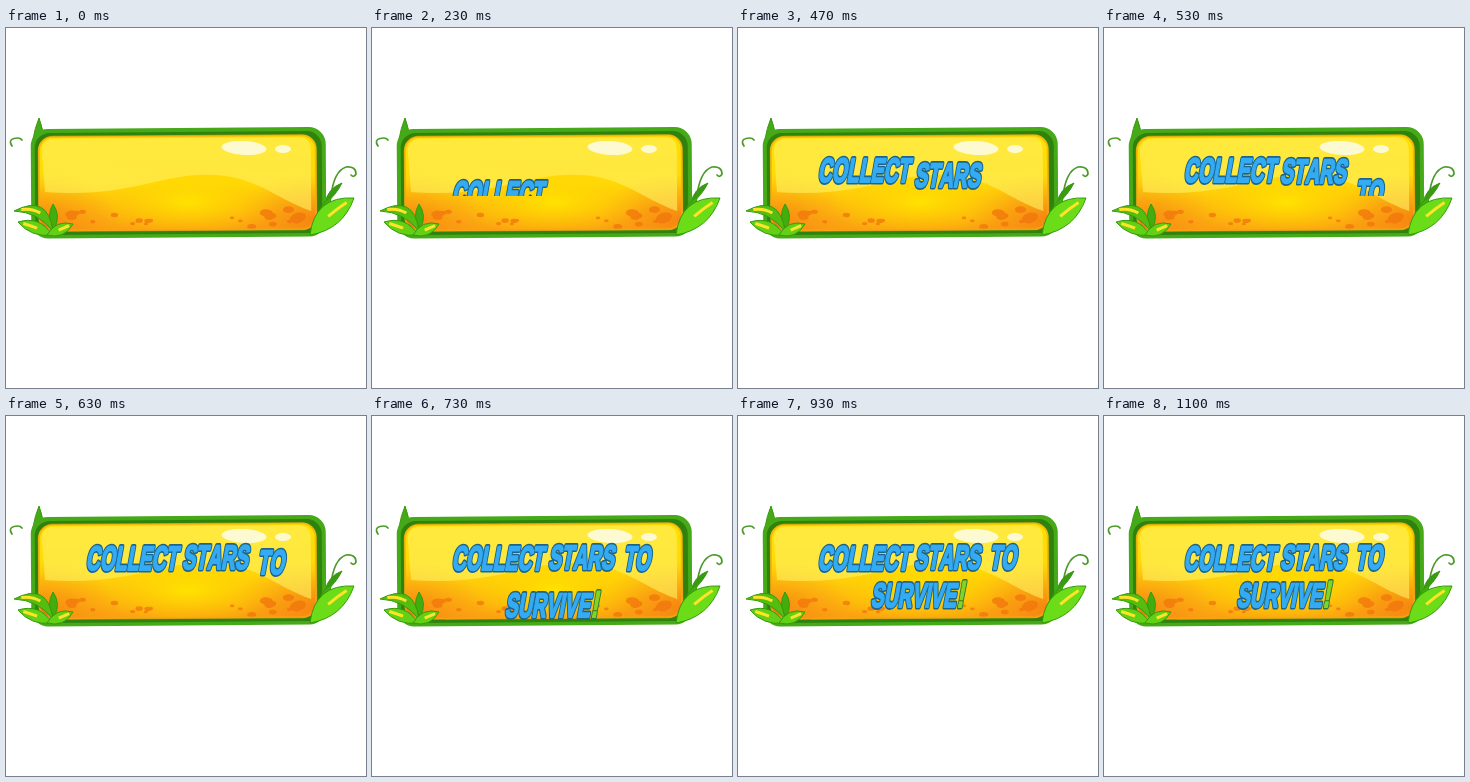
An HTML page that plays this animation: 360 px wide and 360 px high, repeating every 5.01 s.

```html
<!DOCTYPE html>
<html lang="en">
<head>
<meta charset="utf-8">
<title>Collect stars</title>
<style>
  html, body { margin: 0; width: 100%; height: 100%; overflow: hidden; background: #fff; }
  svg { display: block; width: 100vw; height: 100vh; }
  text { font: bold 34px "Liberation Sans", Arial, sans-serif; font-kerning: none; stroke-linejoin: round; }
  .edge { fill: #1b648c; stroke: #1b648c; stroke-width: 5.2; }
  .face { fill: #34abf3; stroke: #34abf3; stroke-width: 2; }
  .bang { font-size: 37px; }
  .bang.edge { fill: #2c7a3a; stroke: #2c7a3a; }
  .bang.face { fill: #86d321; stroke: #86d321; }
  .tendril { fill: none; stroke: #4c9b2a; stroke-width: 1.7; stroke-linecap: round; }
  .vein { fill: none; stroke: #ffe329; stroke-width: 3; stroke-dasharray: 0 45 40 100; }
</style>
</head>
<body>
<svg viewBox="0 0 360 360">
  <defs>
    <linearGradient id="honey" x2="0" y2="1">
      <stop offset="0" stop-color="#ffe000"/>
      <stop offset=".5" stop-color="#ffd908"/>
      <stop offset="1" stop-color="#fb9c12"/>
    </linearGradient>
    <radialGradient id="glow">
      <stop offset="0" stop-color="#ffe200"/>
      <stop offset="1" stop-color="#ffd000" stop-opacity="0"/>
    </radialGradient>
    <radialGradient id="ember">
      <stop offset="0" stop-color="#f47a10" stop-opacity=".75"/>
      <stop offset="1" stop-color="#f98e18" stop-opacity="0"/>
    </radialGradient>
    <clipPath id="panel"><rect x="32.500" y="107.500" width="278" height="95" rx="14"/></clipPath>
    <clipPath id="row0"><rect width="360" height="168"/></clipPath>
    <clipPath id="row1"><rect width="360" height="205"/></clipPath>
  </defs>

  <path class="tendril" d="M6 118Q2 112 8 110.500T16 112"/>
  <path class="tendril" d="M325 168Q328 143 340 139Q350 138 350 146Q348 150 345 147"/>
  <g id="stalks"></g>

  <g transform="rotate(-.4 172 155)">
    <rect x="25" y="100" width="295" height="109.500" rx="17" fill="#46a917"/>
    <rect x="29" y="104" width="287" height="102" rx="15" fill="#2f830d"/>
    <g clip-path="url(#panel)">
      <rect x="32" y="107" width="280" height="97" fill="url(#honey)"/>
      <ellipse cx="36" cy="192" rx="78" ry="48" fill="url(#ember)"/>
      <ellipse cx="308" cy="192" rx="82" ry="46" fill="url(#ember)"/>
      <ellipse cx="182" cy="174" rx="92" ry="36" fill="url(#glow)"/>
      <g id="spots" fill="#f0760c" opacity=".75"></g>
      <path d="M36 122Q36 110 50 110H292Q305 110 305 122V184C270 172 250 147 200 147S120 170 39 163Z" fill="#fff062" opacity=".62"/>
    </g>
    <rect x="33" y="108" width="277" height="94" rx="14" fill="none" stroke="#f5a912" stroke-width="2" opacity=".7"/>
  </g>
  <g fill="#fdfad2">
    <ellipse cx="238" cy="120" rx="22.500" ry="7" transform="rotate(3 238 120)"/>
    <ellipse cx="277" cy="121" rx="8" ry="4"/>
  </g>

  <g id="leaves"></g>
  <g id="words"></g>
</svg>
<script>
const LOOP = 5010, STEP = 100 / 3;
const START = 200, STAGGER = 150, DURATION = 450, RISE = 39;
const el = id => document.getElementById(id);

let seed = 7;
function random() {
  seed = seed * 16807 % 2147483647;
  return seed / 2147483647;
}

// Spots thin out and shrink away from the lower corners.
function spot(_, i) {
  const away = random() ** 1.3, size = 1.5 + 5 * random() * (1 - away * .7);
  const x = i % 2 ? 306 - 95 * away : 38 + 115 * away;
  const y = 200 - random() * (22 - 12 * away);
  return `<ellipse cx="${x}" cy="${y}" rx="${size * 1.3}" ry="${size * .8}"/>`;
}
el("spots").innerHTML = Array.from({ length: 28 }, spot).join("");

// A leaf from base to tip; left and right bend its two sides off the middle line.
function leaf(x, y, tipX, tipY, left, right, fill, vein = true) {
  const dx = tipX - x, dy = tipY - y, length = Math.hypot(dx, dy);
  const bend = by => `${x + dx / 2 + by * dy / length} ${y + dy / 2 - by * dx / length}`;
  const body = `<path d="M${x} ${y}Q${bend(left)} ${tipX} ${tipY}Q${bend(right)} ${x} ${y}Z"
    fill="${fill}" stroke="#369a0b"/>`;
  return body + (vein ? `<path class="vein" pathLength="100"
    d="M${x} ${y}Q${bend((left + right) / 2)} ${tipX} ${tipY}"/>` : "");
}
el("stalks").innerHTML =
  leaf(26, 133, 33, 90, 5, -14, "#46a918", false) +
  leaf(319, 176, 336, 155, 8, -3, "#3b9a14", false);
el("leaves").innerHTML =
  leaf(48, 201, 47, 176, 8, -8, "#43ad0e", false) +
  leaf(47, 203, 8, 183, -31, -10, "#55bd10") +
  leaf(46, 207, 12, 194, -14, 10, "#62d015") +
  leaf(41, 207, 67, 196, 11, -11, "#62d015") +
  leaf(313, 190, 325, 169, 7, -7, "#43ad0e", false) +
  leaf(304, 207, 348, 170, 27, -17, "#6bdc18");

// One slanted, condensed lettering style for every word.
const letter = (text, x, y, kind = "") => ["edge", "face"].map(layer =>
  `<text class="${layer} ${kind}" transform="matrix(.57 0 -.18 1 ${x} ${y})">${text}</text>`).join("");

const words = [
  { row: 0, art: letter("COLLECT", 79.5, 153.5) },
  { row: 0, art: letter("STARS", 176, 153) },
  { row: 0, art: letter("TO", 251, 153) },
  { row: 1, art: letter("SURVIVE", 132.5, 190.5) + letter("!", 218.5, 190.5, "bang") }
];
el("words").innerHTML = words.map(({ row, art }) =>
  `<g clip-path="url(#row${row})"><g class="word">${art}</g></g>`).join("");
const groups = document.querySelectorAll(".word");

const easeOut = p => p >= 1 ? 1 : 1 - 2 ** (-10 * p);

function draw(now) {
  const time = Math.floor((now % LOOP + 5) / STEP) * STEP;
  groups.forEach((group, i) => {
    // The half millisecond absorbs rounding in the stepped time.
    const progress = (time - START - STAGGER * i + .5) / DURATION;
    group.style.display = progress >= 0 ? "" : "none";
    group.setAttribute("transform", `translate(0 ${RISE * (1 - easeOut(Math.max(progress, 0)))})`);
  });
}

const start = performance.now();
function tick() {
  draw(performance.now() - start);
  requestAnimationFrame(tick);
}
tick();
</script>
</body>
</html>
```
